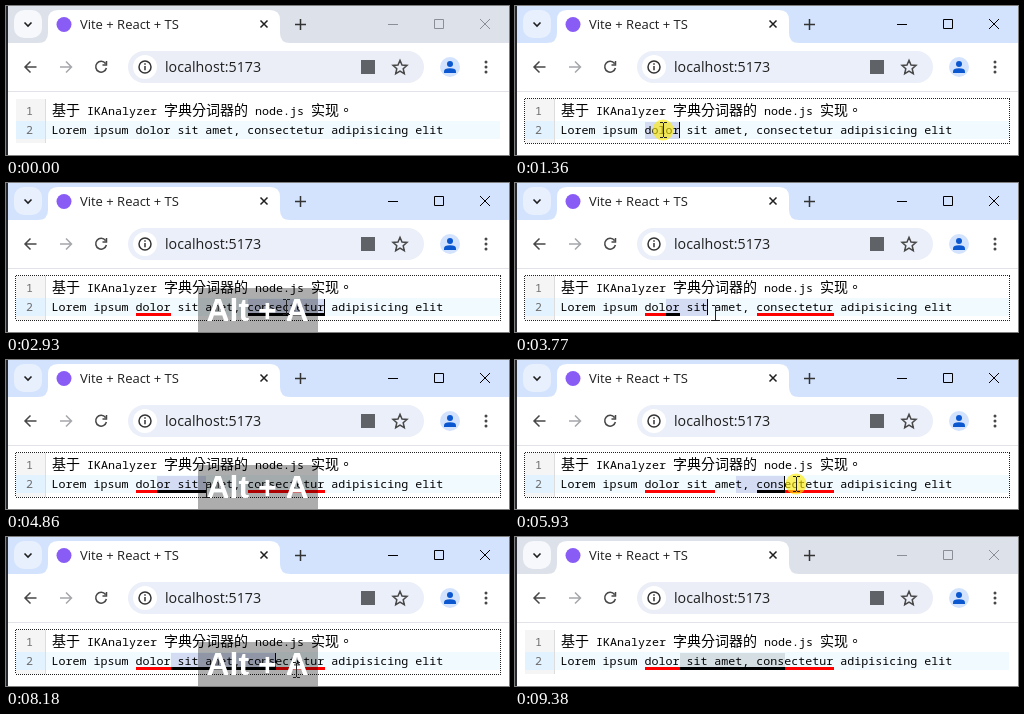
Recreate the animation shown at these times as an HTML page with a canvas. Size 503 by 149 pixels, loop 9450 ms.

```html
<!DOCTYPE html>
<html lang="en">
<head>
<meta charset="utf-8">
<title>Editor selection demo</title>
<style>
html, body { margin: 0; width: 100%; height: 100%; overflow: hidden; background: #fff; }
canvas { display: block; width: 503px; height: 149px; }
</style>
</head>
<body>
<canvas id="stage" width="503" height="149"></canvas>
<script>
const ctx = document.getElementById('stage').getContext('2d');
const LOOP = 9450, FOCUS_IN = 1090, FOCUS_OUT = 9380;
const UI = '"Open Sans", "Noto Sans", sans-serif';
const MONO = '11.667px "Noto Sans Mono", monospace';
const CJK = '14px "Noto Sans CJK TC", "Noto Sans CJK", sans-serif';
const TEXT_X = 46, CHAR = 7;
const TRAVEL = 600, SETTLE = 70, LAG = 50, BLINK = 1200;
const HINT_TIME = 1210, HINT_FADE = 130;

// Columns are character positions in the second line.
const GESTURES = [
  { start: 0, end: 100, from: 20, to: 20, y: 165, idle: true },
  { start: 1090, end: 1430, from: 12, to: 17, y: 124, word: true },
  { start: 2300, end: 2480, from: 28, to: 39, y: 124, word: true },
  { start: 3600, end: 3760, from: 15, to: 22, y: 130 },
  { start: 5720, end: 5960, from: 25, to: 34, y: 124 },
  { start: 6250, end: 6330, from: 26, to: 21, y: 124 },
  { start: 7350, end: 7570, from: 17, to: 32, y: 122 },
  { start: 8650, end: LOOP, from: 43, to: 43, y: 165, idle: true }
];
const SHORTCUTS = [1850, 2550, 4110, 6050, 6380, 7710];

const colX = col => TEXT_X + col * CHAR;
const lerp = (a, b, p) => a + (b - a) * p;

function ease(t, start, end) {
  const p = Math.min(1, Math.max(0, (t - start) / (end - start)));
  return p * p * (3 - 2 * p);
}

const lastGesture = t => GESTURES.filter(g => !g.idle && g.start <= t).pop();

function selectionAt(t) {
  const g = lastGesture(t - LAG);
  if (!g) return null;
  const head = g.word ? g.to : Math.round(lerp(g.from, g.to, ease(t - LAG, g.start, g.end)));
  return { from: Math.min(g.from, head), to: Math.max(g.from, head), head };
}

function gestureX(g, p) {
  return colX(lerp(g.from, g.to, g.word ? 0.5 : p));
}

function mouseAt(t) {
  const i = GESTURES.findIndex(g => t < g.end);
  const g = GESTURES[i], prev = GESTURES[i - 1];
  if (t >= g.start) return { x: gestureX(g, ease(t, g.start, g.end)), y: g.y, pressed: !g.idle };
  const arrive = Math.max(g.start - SETTLE, prev.end + SETTLE);
  const p = ease(t, Math.max(prev.end, arrive - TRAVEL), arrive);
  return { x: lerp(gestureX(prev, 1), gestureX(g, 0), p), y: lerp(prev.y, g.y, p), pressed: false };
}

function rect(x, y, w, h, color) {
  ctx.fillStyle = color;
  ctx.fillRect(x, y, w, h);
}

function rounded(x, y, w, h, r, color) {
  ctx.fillStyle = color;
  ctx.beginPath();
  ctx.roundRect(x, y, w, h, r);
  ctx.fill();
}

function disc(x, y, r, color) {
  rounded(x - r, y - r, 2 * r, 2 * r, r, color);
}

function shape(d, color) {
  ctx.fillStyle = color;
  ctx.fill(new Path2D(d));
}

function stroke(d, color, width = 1.5) {
  ctx.strokeStyle = color;
  ctx.lineWidth = width;
  ctx.stroke(new Path2D(d));
}

function text(str, x, y, font, color = '#000') {
  ctx.font = font;
  ctx.fillStyle = color;
  ctx.fillText(str, x, y);
}

function drawTabs(focused) {
  rect(0, 0, 503, 37, focused ? '#d3e3fd' : '#dde1e9');
  rounded(8, 4, 28, 28, 10, focused ? '#e8f0fe' : '#f6f8fc');
  stroke('M18.5 16.5l3.5 3.5 3.5-3.5', '#1f1f1f', 1.6);
  shape('M32 37q10 0 10-10V14q0-10 10-10H264q10 0 10 10V27q0 10 10 10z', '#fff');
  disc(58, 18.5, 7.5, '#8a5cf6');
  text('Vite + React + TS', 74, 23, '13px ' + UI, '#1f1f1f');
  stroke('M254.5 14.5l7 7M261.5 14.5l-7 7', '#1f1f1f', 1.5);
  stroke('M289 18.5h11M294.5 13v11', '#333', 1.5);
  stroke('M382 18.5h10M428.5 13.5h9v9h-9zM474 13l10 10M484 13l-10 10', focused ? '#000' : '#8b8e94', 1);
}

function drawToolbar(focused) {
  const dark = '#474747';
  rect(0, 37, 503, 112, '#fff');
  rect(0, 85, 503, 1, '#e1e3e8');
  stroke('M30.5 61H19M24.5 55.5l-5.5 5.5 5.5 5.5', dark);
  stroke('M54 61H65.5M60 55.5l5.5 5.5-5.5 5.5', '#a5a7aa');
  stroke('M99.5 57.5A5.4 5.4 0 1 0 100.4 62M100.5 55v4h-4', dark);
  rounded(122, 45, 296, 32, 16, focused ? '#ebeff9' : '#ebeef7');
  disc(139, 61, 12, '#fff');
  stroke('M133 61a6 6 0 1 0 12 0a6 6 0 1 0-12 0M139 60v4.2M139 57.2v1.6', '#333');
  text('localhost:5173', 159, 66, '14.25px ' + UI, '#1f1f1f');
  rect(355, 54, 14, 14, '#5f6368');
  stroke('M394 54.3l2 4.7 5 .4-3.8 3.3 1.1 5-4.3-2.6-4.3 2.6 1.1-5-3.8-3.3 5-.4z', dark, 1.5);
  disc(444, 61, 10, '#d3e3fd');
  disc(444, 58, 3, '#0b57d0');
  shape('M438 67v-1.5q0-3.2 6-3.2t6 3.2V67z', '#0b57d0');
  for (const y of [56, 61, 66]) disc(480, y, 1.5, dark);
}

function drawUnderlines(t, sel) {
  for (const time of SHORTCUTS.filter(s => s <= t)) {
    const { from, to } = selectionAt(time);
    rect(colX(from), 130, (to - from) * CHAR, 3, '#f00');
  }
  if (!sel) return;
  for (const time of SHORTCUTS.filter(s => s <= t)) {
    const mark = selectionAt(time);
    const from = Math.max(mark.from, sel.from), to = Math.min(mark.to, sel.to);
    if (to > from) rect(colX(from), 130, (to - from) * CHAR, 3, '#000');
  }
}

function drawEditor(t, focused, pressed) {
  const sel = selectionAt(t);
  rect(10, 93, 30, 44, '#f5f5f5');
  rect(39, 93, 1, 44, '#ddd');
  rect(10, 115, 29, 18, '#e2f2ff');
  if (sel) rect(colX(sel.from), 116, (sel.to - sel.from) * CHAR, 17, focused ? '#d7d4f0' : '#d9d9d9');
  rect(40, 115, 454, 18, '#cceeff44');

  text('1', 20, 109, MONO, '#6c6c6c');
  text('2', 20, 128, MONO, '#6c6c6c');
  text('基于', colX(0), 109, CJK);
  text('IKAnalyzer', colX(5), 109, MONO);
  text('字典分词器的', colX(16), 109, CJK);
  text('node.js', colX(29), 109, MONO);
  text('实现。', colX(37), 109, CJK);
  drawUnderlines(t, sel);
  text('Lorem ipsum dolor sit amet, consectetur adipisicing elit', TEXT_X - 0.5, 128, MONO);

  if (!focused) return;
  const blinkOn = sel && (t - LAG - lastGesture(t - LAG).end) % BLINK < BLINK / 2;
  if (sel && (pressed || blinkOn)) rect(colX(sel.head) - 1, 116, 1, 16, '#000');
  ctx.setLineDash([1, 1]);
  stroke('M10 92.5H495M10 137.5H495M9.5 93V137M494.5 93V137', '#212121', 1);
  ctx.setLineDash([]);
}

function drawKeyHint(t) {
  const age = t - SHORTCUTS.filter(s => s <= t).pop();
  if (!(age < HINT_TIME)) return;
  ctx.globalAlpha = age < HINT_TIME - HINT_FADE ? 1 : 0.5;
  rect(192, 105, 120, 44, 'rgba(0,0,0,.32)');
  ctx.textAlign = 'center';
  text('Alt + A', 251.5, 138, 'bold 32px "Liberation Sans", sans-serif', '#fff');
  ctx.textAlign = 'left';
  ctx.globalAlpha = 1;
}

function drawMouse({ x, y, pressed }) {
  ctx.save();
  ctx.translate(Math.round(x), Math.round(y));
  if (pressed) disc(0, 0, 10.5, 'rgba(255,235,0,.62)');
  stroke('M-3-7.5h3M1-7.5h3M.5-7v14M-3 7.5h3M1 7.5h3', '#222', 1);
  ctx.restore();
}

function render(t) {
  const focused = t >= FOCUS_IN && t < FOCUS_OUT;
  const mouse = mouseAt(t);
  drawTabs(focused);
  drawToolbar(focused);
  drawEditor(t, focused, mouse.pressed);
  drawKeyHint(t);
  drawMouse(mouse);
  rect(0, 0, 2, 149, '#25282c');
}

const started = performance.now();
function tick() {
  render((performance.now() - started) % LOOP);
  requestAnimationFrame(tick);
}
tick();
</script>
</body>
</html>
```
